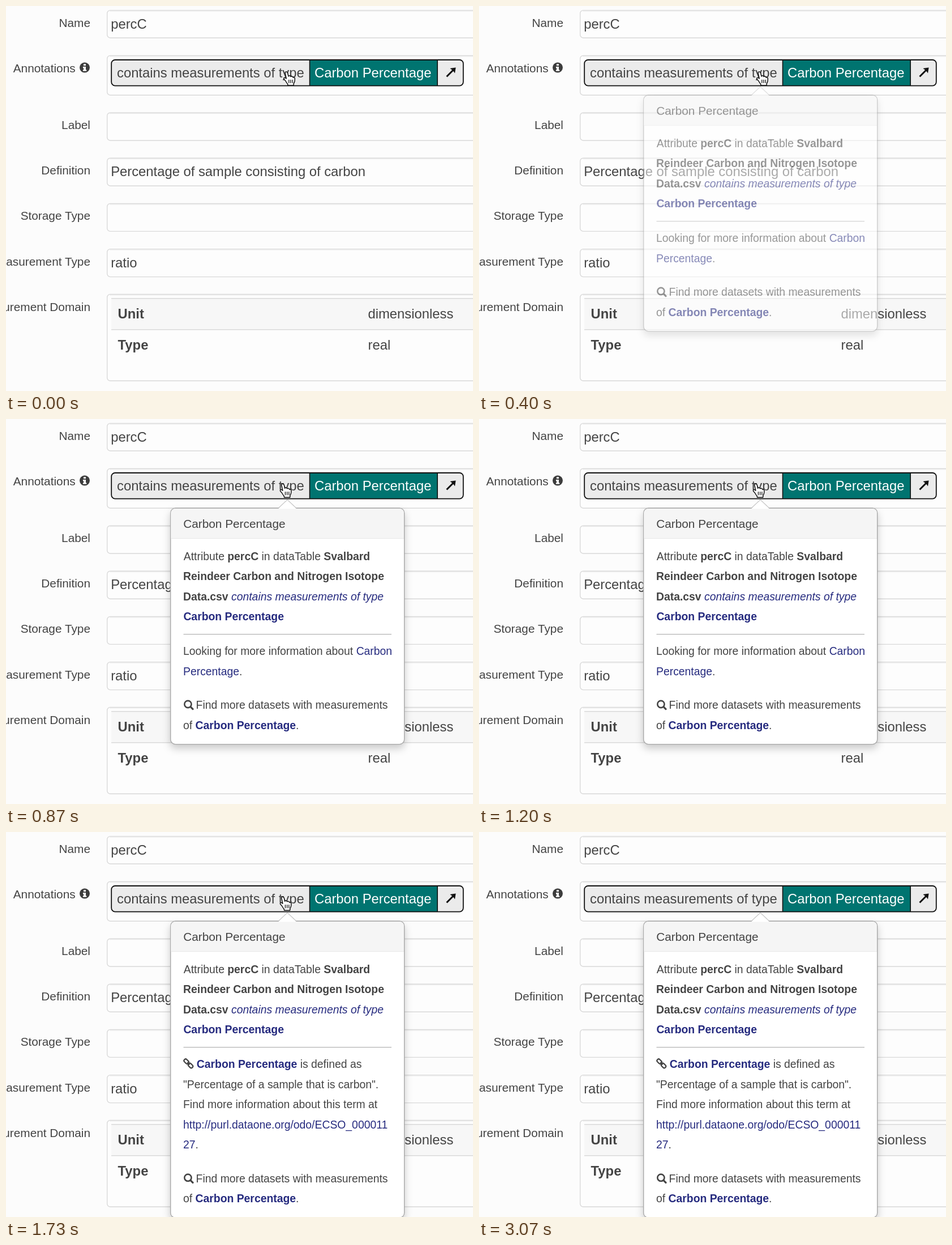
Recreate the animation shown at these times as an HTML page. Size 825 px wide and 679 px high, loop 3140 ms.

```html
<!DOCTYPE html>
<html lang="en">
<head>
<meta charset="utf-8">
<title>Annotation popover</title>
<style>
  html, body { margin: 0; width: 100%; height: 100%; overflow: hidden; background: #fcfcfc; }
  svg { display: block; }
  text { font-family: "Liberation Sans", Arial, sans-serif; fill: #444; white-space: pre; }
  .label { font-size: 20.8px; text-anchor: end; }
  .value { font-size: 23.8px; }
  .title { font-size: 20.8px; }
  .body { font-size: 19.37px; }
  .b { font-weight: 700; }
  .link { fill: #262b7f; }
  .i { font-style: italic; }
  .field { fill: #fdfdfd; stroke: #d9d9d9; stroke-width: 1.4; }
  .inset { stroke: #ececec; stroke-width: 1.5; }
  .rule { stroke: #dadada; stroke-width: 1.4; }
  #card { fill: #fff; stroke: #a9a9a9; stroke-width: 1.4; filter: drop-shadow(0 7px 7px rgba(0,0,0,.2)); }
</style>
</head>
<body>
<svg width="825" height="679" viewBox="0 0 825 679">
  <g id="form"></g>

  <g id="info">
    <circle cx="139" cy="108.6" r="9" fill="#3c3c3c"/>
    <path d="M137 102.3h4v3h-4zM136 107h5v5.4h1.3v2.4h-6.4v-2.4h1.3v-3h-1.2z" fill="#fff"/>
  </g>

  <g id="chip">
    <rect x="186.2" y="95" width="621.6" height="45.6" rx="6.5" fill="#ebebeb"/>
    <rect x="536.5" y="95" width="225.5" height="45.6" fill="#007470"/>
    <path d="M536.5 95v45.6M762.2 95v45.6" stroke="#111" stroke-width="1.6"/>
    <rect x="186.2" y="95" width="621.6" height="45.6" rx="6.5" fill="none" stroke="#111" stroke-width="1.8"/>
    <text class="value" x="196" y="125.6">contains measurements of type</text>
    <text class="value" x="545" y="125.6" style="fill:#fff">Carbon Percentage</text>
    <path d="M778.5 124.5L790 113" stroke="#111" stroke-width="3"/>
    <path d="M794.6 108.4L793 118.6L790 114.6L788.4 113L784.4 110Z" fill="#111"/>
  </g>

  <g id="table">
    <rect x="186" y="516" width="639" height="54.5" fill="#f7f7f7"/>
    <path class="rule" d="M186 515.7H825M186 570.7H825"/>
    <text class="value b" x="197.6" y="551">Unit</text>
    <text class="value" x="639.5" y="551">dimensionless</text>
    <text class="value b" x="197.6" y="606">Type</text>
    <text class="value" x="639.5" y="606">real</text>
  </g>

  <g id="pop">
    <rect id="card" x="290.7" y="157.3" width="413" height="416.3" rx="8.5"/>
    <path d="M291.4 210.5V166a8 8 0 0 1 8-8H695a8 8 0 0 1 8 8V210.5Z" fill="#f5f5f5"/>
    <path d="M291.4 210.6H703" stroke="#e9e9e9" stroke-width="1.4"/>
    <path d="M481 158.4L497 142.8L513 158.4Z" fill="#fff"/>
    <path d="M481 157.4L497 142.4L513 157.4" fill="none" stroke="#c4c4c4" stroke-width="1.2"/>
    <text class="title" x="313.2" y="192">Carbon Percentage</text>
    <g class="body">
      <text x="313.8" y="248.5">Attribute <tspan class="b">percC</tspan> in dataTable <tspan class="b">Svalbard</tspan></text>
      <text class="b" x="313" y="284">Reindeer Carbon and Nitrogen Isotope</text>
      <text x="313" y="319.6"><tspan class="b">Data.csv</tspan> <tspan class="link i">contains measurements of type</tspan></text>
      <text class="b link" x="313.4" y="355.2">Carbon Percentage</text>
    </g>
    <path d="M313.5 379.6H681" stroke="#b4b4b4" stroke-width="1.4"/>
    <g class="body" id="brief">
      <text x="313" y="416">Looking for more information about <tspan class="link">Carbon</tspan></text>
      <text x="313" y="451.6"><tspan class="link">Percentage</tspan>.</text>
    </g>
    <g class="body" id="full">
      <g fill="none" stroke="#444" stroke-width="2.2">
        <rect x="-4.6" y="-2.9" width="9.2" height="5.8" rx="2.7" transform="translate(318.6 404.6) rotate(45)"/>
        <rect x="-4.6" y="-2.9" width="9.2" height="5.8" rx="2.7" transform="translate(326 412) rotate(45)"/>
        <path d="M320.2 406.2L324.4 410.4"/>
      </g>
      <text x="336.8" y="416"><tspan class="b link">Carbon Percentage</tspan> is defined as</text>
      <text x="313" y="451.6">"Percentage of a sample that is carbon".</text>
      <text x="313" y="487.2">Find more information about this term at</text>
      <text class="link" x="313" y="522.8">http://purl.dataone.org/odo/ECSO_000011</text>
      <text x="313" y="558.4"><tspan class="link">27</tspan>.</text>
    </g>
    <g class="body" id="foot">
      <circle cx="321.4" cy="503" r="6.1" fill="none" stroke="#444" stroke-width="2.6"/>
      <path d="M326 507.6L330 511.6" stroke="#444" stroke-width="3.2" stroke-linecap="round"/>
      <text x="335.6" y="511">Find more datasets with measurements</text>
      <text x="313" y="546.6">of <tspan class="b link">Carbon Percentage</tspan>.</text>
    </g>
  </g>

  <g id="hand" stroke="#111" stroke-width="1.5" stroke-linejoin="round" stroke-linecap="round">
    <path fill="#fff" d="M3.2 3.6Q3 1 5.2 1Q7 1 7.6 3.2L9 9Q9.5 7.6 11.3 8Q12.8 8.3 13 9.6Q14 8.6 15.5 9.2Q16.9 9.7 17 11Q18.2 10.3 19.4 11.2Q20.5 12 20.3 14L20 17.5Q19.6 19.5 18.3 21.5L18 25H8L7.5 22.5Q5 19.5 3.8 17L1 14Q.3 12.3 1.6 11.5Q3 11 5.2 13Z"/>
    <path fill="none" stroke-width="1.3" d="M9.8 15.5V20.6M13 15.5V20.6M16.2 15.5V20.6"/>
  </g>
</svg>
<script>
const LOOP = 3140, TICK = 200 / 3;
const $ = id => document.getElementById(id);

// label, label baseline, field top, field height, value
const rows = [
  ["Name", 36.6, 7.6, 48.6, "percC"],
  ["Annotations", 116.6, 87.4, 69.8, ""],
  ["Label", 217.4, 188.2, 49, ""],
  ["Definition", 297.4, 268.2, 49, "Percentage of sample consisting of carbon"],
  ["Storage Type", 377.4, 348.4, 49, ""],
  ["Measurement Type", 457.6, 428.6, 49, "ratio"],
  ["Measurement Domain", 537.6, 508.4, 152.6, ""]
];

$("form").innerHTML = rows.map(([name, base, top, h, value]) => `
  <rect class="field" x="178.7" y="${top}" width="680" height="${h}" rx="5.5"/>
  <path class="inset" d="M183 ${top + 1.4}H825"/>
  <text class="label" x="${name === "Annotations" ? 122.6 : 149}" y="${base}">${name}</text>
  <text class="value" x="185.2" y="${top + 32.2}">${value}</text>`).join("");

// time, x, y
const path = [
  [0, 490, 115],
  [590, 490, 115],
  [870, 483.6, 113.2],
  [1800, 483.6, 113.2],
  [2230, 553.6, 103.6],
  [LOOP, 553.6, 103.6]
];
const FADE = 318, FADE_MS = 150, EXPAND = 1330, HIDE = 2330;

const clamp = v => Math.min(1, Math.max(0, v));
const ease = u => u * u * (3 - 2 * u);

function handAt(t) {
  const n = path.findIndex(p => p[0] > t);
  const [t0, x0, y0] = path[n - 1], [t1, x1, y1] = path[n];
  const u = ease((t - t0) / (t1 - t0));
  return [x0 + (x1 - x0) * u, y0 + (y1 - y0) * u];
}

function draw(now) {
  const step = Math.floor((Math.floor(now % LOOP / 10) * 10 + 4) / TICK);
  const t = Math.round(step * TICK / 10) * 10;
  const open = t >= EXPAND;

  $("pop").style.opacity = clamp((t - FADE) / FADE_MS);
  $("brief").style.display = open ? "none" : "";
  $("full").style.display = open ? "" : "none";
  $("foot").setAttribute("transform", `translate(0 ${open ? 106.7 : 0})`);
  $("card").setAttribute("height", open ? 523 : 416.3);

  const [x, y] = handAt(t);
  $("hand").setAttribute("transform", `translate(${x} ${y})`);
  $("hand").style.display = t < HIDE ? "" : "none";
}

const start = performance.now();
function loop() {
  draw(performance.now() - start);
  requestAnimationFrame(loop);
}
loop();
</script>
</body>
</html>
```
